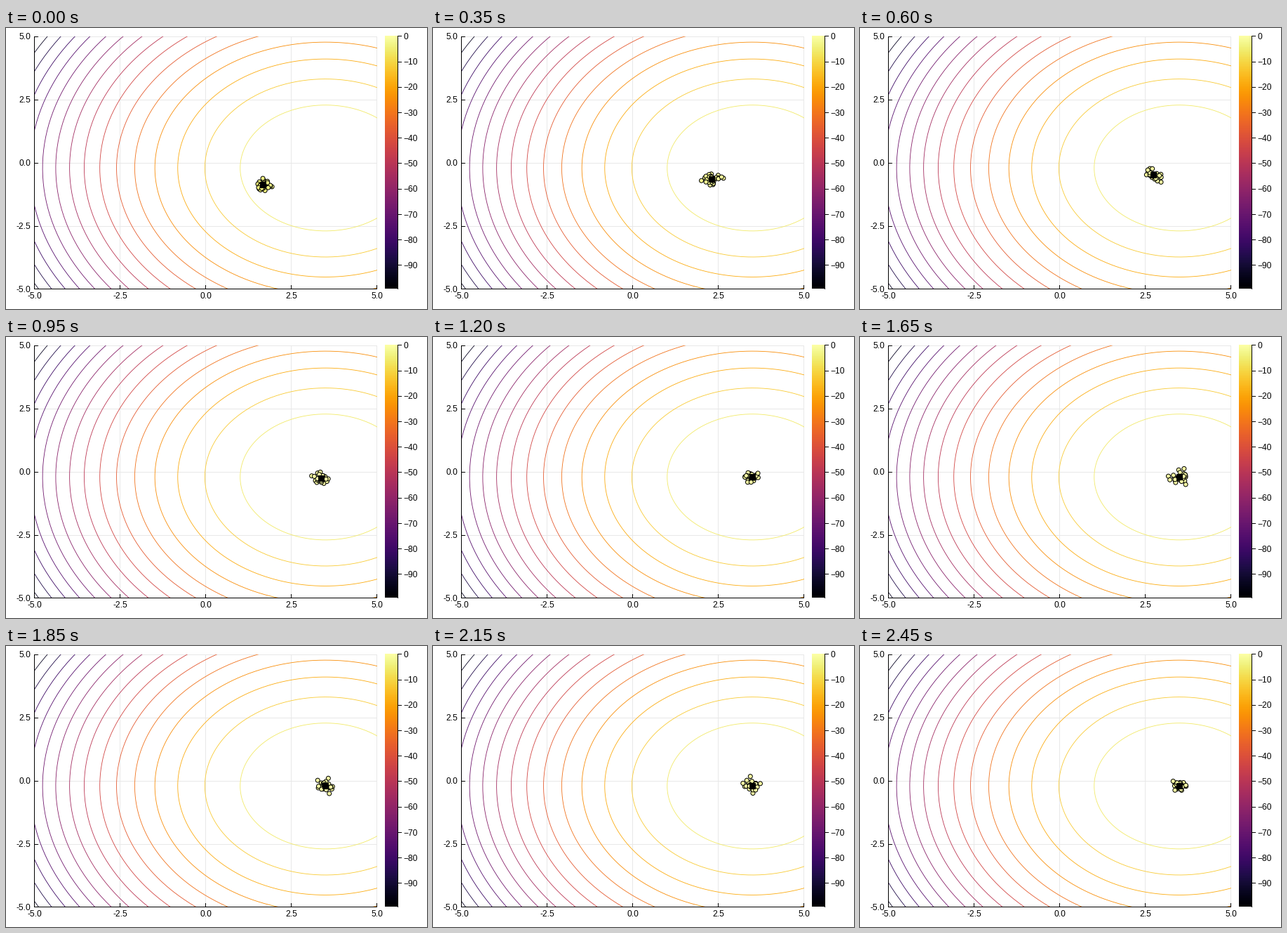
These frames come from a looping animation (600 by 400 pixels, 2500 ms). A matplotlib script:

```python
import numpy as np
import matplotlib.pyplot as plt
from matplotlib.animation import FuncAnimation
from matplotlib.patches import Rectangle

plt.rcParams["font.family"] = "Liberation Sans"

W, H, DPI = 600, 400, 100
PT = 72 / DPI                      # points per pixel
LEFT, RIGHT, TOP, BOTTOM = 40.5, 528.5, 12.3, 371.9
BAR_L, BAR_R = 540.3, 558.3
FRAMES, STEP = 50, 50

START = np.array([1.68, -0.87])    # swarm mean at the start
PEAK = np.array([3.5, -0.2])
ARRIVAL = 20.5                     # steps until the mean reaches the peak
MEMBERS, SPREAD = 30, 0.115
LOW = -(8.5 ** 2 + 5.2 ** 2)       # value in the farthest corner
CMAP = plt.get_cmap("inferno")


def px(x):
    return LEFT + (x + 5) / 10 * (RIGHT - LEFT)


def py(y):
    return BOTTOM - (y + 5) / 10 * (BOTTOM - TOP)


def color(value):
    return CMAP(1 - np.asarray(value) / LOW)


fig = plt.figure(figsize=(W / DPI, H / DPI), dpi=DPI, facecolor="white")
ax = fig.add_axes([0, 0, 1, 1])
ax.axis("off")


def rule(x0, y0, x1, y1, col="black", z=4):
    """Straight line of one pixel, centred on the pixel grid."""
    xs, ys = np.floor([[x0, x1], [y0, y1]]) + 0.5
    ax.plot(xs, ys, color=col, lw=PT, solid_capstyle="projecting",
            snap=False, zorder=z)


def label(x, y, text, ha):
    ax.text(x, y, text, ha=ha, va="baseline", fontsize=12 * PT, color="black")


def draw_axes():
    for v in np.linspace(-5, 5, 5):
        x, y = px(v), py(v)
        rule(x, TOP, x, BOTTOM, "#e8e8e8", 1)
        rule(LEFT, y, RIGHT, y, "#e8e8e8", 1)
        rule(x, BOTTOM, x, BOTTOM - 5)
        rule(LEFT, y, LEFT + 5, y)
        label(x, 385.2, f"{v:.1f}", "center")
        label(35.6, y + 4.2, f"{v:.1f}", "right")
    rule(LEFT, TOP, LEFT, BOTTOM)
    rule(LEFT, BOTTOM, RIGHT, BOTTOM)


def draw_contours():
    clip = Rectangle((LEFT, TOP), RIGHT - LEFT, BOTTOM - TOP,
                     transform=ax.transData)
    t = np.linspace(0, 2 * np.pi, 400)
    for level in LOW * np.arange(1, 16) / 16:
        r = np.sqrt(-level)
        curve, = ax.plot(px(PEAK[0] + r * np.cos(t)), py(PEAK[1] + r * np.sin(t)),
                         color=color(level), lw=0.85 * PT, zorder=2)
        curve.set_clip_path(clip)


def draw_colorbar():
    ramp = np.linspace(1, 0, 256)[:, None]
    ax.imshow(ramp, cmap=CMAP, vmin=0, vmax=1, aspect="auto", zorder=2,
              extent=(BAR_L, BAR_R, BOTTOM - 0.9, TOP - 0.8))
    rule(BAR_R, TOP - 0.5, BAR_R, BOTTOM - 0.9)
    for v in range(0, -91, -10):
        y = TOP - 0.5 + v / LOW * (BOTTOM - TOP)
        rule(BAR_R, y, BAR_R + 5, y)
        label(566.8, y + 4.2, f"\u2212{-v}" if v else "0", "left")


draw_axes()
draw_contours()
draw_colorbar()
ax.set_xlim(0, W)
ax.set_ylim(H, 0)

swarm = ax.scatter([], [], s=(6 * PT) ** 2, edgecolors="black",
                   linewidths=PT, zorder=5)
mean, = ax.plot([], [], "s", ms=8 * PT, mew=PT, color="black", zorder=6)


def update(i):
    center = START + (PEAK - START) * min(i / ARRIVAL, 1)
    rng = np.random.default_rng(100 + i)
    x, y = (center + rng.normal(0, SPREAD, (MEMBERS, 2))).T
    swarm.set_offsets(np.column_stack([px(x), py(y)]))
    swarm.set_facecolors(color(-((x - PEAK[0]) ** 2 + (y - PEAK[1]) ** 2)))
    mean.set_data([px(center[0])], [py(center[1])])
    return swarm, mean


anim = FuncAnimation(fig, update, frames=FRAMES, interval=STEP,
                     repeat=True, repeat_delay=0, blit=False)
plt.show()
```
